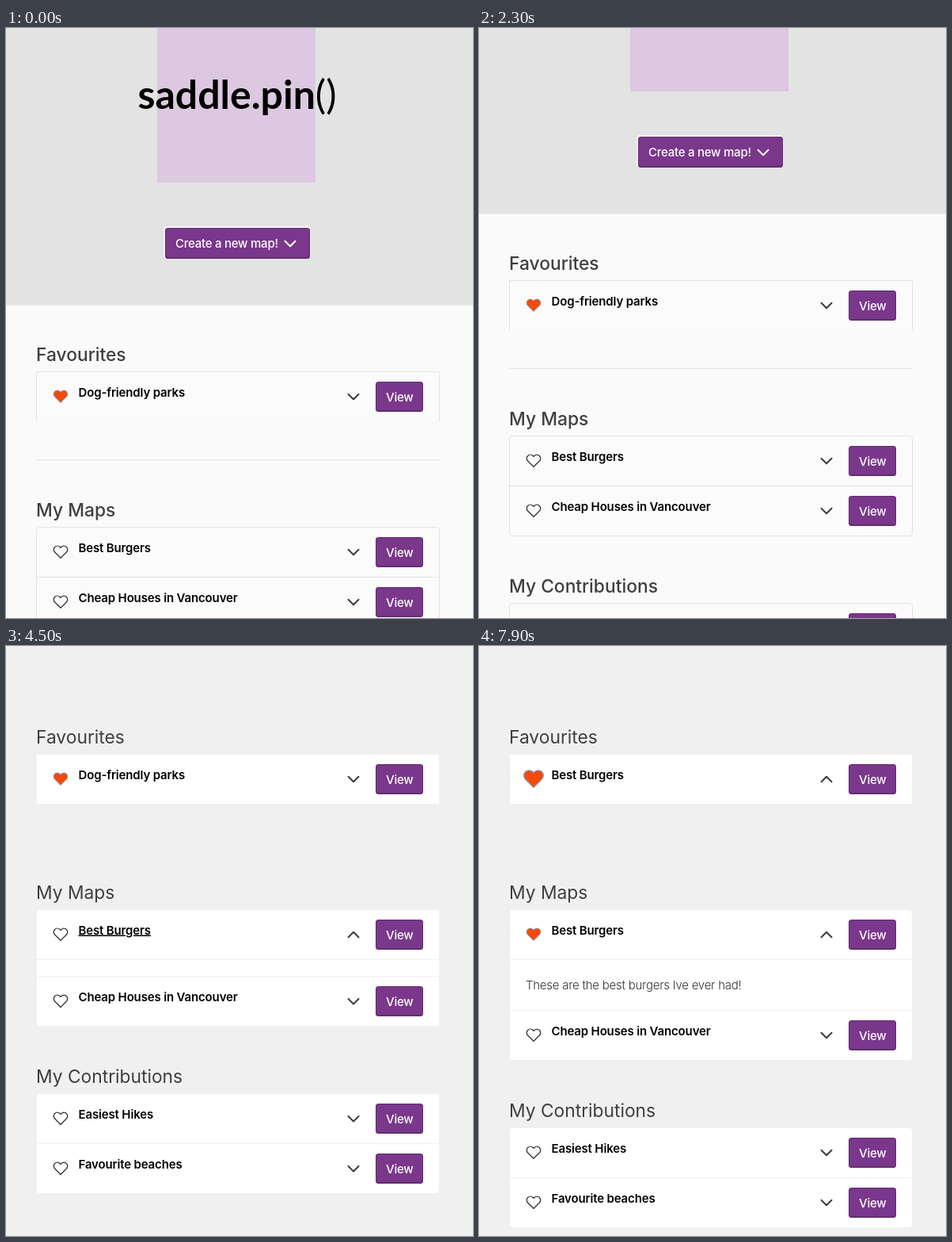
Write an HTML page that moves like this. It is 590x744 px and loops after 8000 ms.

```html
<!DOCTYPE html>
<html lang="en">
<head>
<meta charset="utf-8">
<title>Map lists</title>
<style>
  html, body { margin: 0; width: 100%; height: 100%; overflow: hidden; }
  svg { display: block; font-family: Inter, "Open Sans", sans-serif; }
  text { font-size: 15px; letter-spacing: -.25px; }
  .heading { font-size: 22.8px; letter-spacing: 0; fill: #3f3f3f; }
  .item { font-weight: 600; letter-spacing: -.15px; fill: #000; }
  .note { font-weight: 300; fill: #333; }
  .label { font-weight: 500; fill: #fff; }
  .wordmark { font: 700 50px Lato, sans-serif; letter-spacing: 0; text-anchor: middle; }
  .thin { font-weight: 400; }
  .underlined { text-decoration: underline; }
</style>
</head>
<body>
<svg id="stage" width="590" height="744" viewBox="0 0 590 744"></svg>
<script>
const LOOP = 8000;
const STEP = 100;
const PURPLE = '#7a378b';
const ROW = 63;
const GROWTH = 64;
const HEART = 'M20.84 4.61a5.5 5.5 0 0 0-7.78 0L12 5.67l-1.06-1.06a5.5 5.5 0 0 0-7.78 7.78L12 21.23l8.84-8.84a5.5 5.5 0 0 0 0-7.78z';
const SCROLL = [[0, 0], [1000, 0], [1500, 2], [1900, 7], [2100, 45], [2300, 115],
                [2600, 225], [2800, 277], [2900, 289], [3100, 297]];

const stage = document.getElementById('stage');

function ease(t, start, end) {
  const p = Math.min(1, Math.max(0, (t - start) / (end - start)));
  return p * p * (3 - 2 * p);
}

function scrollAt(t) {
  const next = SCROLL.findIndex(([time]) => time > t);
  if (next < 0) return SCROLL[SCROLL.length - 1][1];
  const [t0, y0] = SCROLL[next - 1], [t1, y1] = SCROLL[next];
  return Math.round(y0 + (y1 - y0) * (t - t0) / (t1 - t0));
}

const rect = (x, y, w, h, fill, extra = '') =>
  `<rect x="${x}" y="${y}" width="${w}" height="${h}" fill="${fill}" ${extra}/>`;

const text = (x, y, kind, content) => `<text x="${x}" y="${y}" class="${kind}">${content}</text>`;

const line = (y, color) => rect(38, y, 510, 1, color);

const chevron = (x, y, color, up) =>
  `<path transform="translate(${x} ${y}) scale(1 ${up ? -1 : 1})" d="M-6.5-3.2L0 3.3L6.5-3.2"
    fill="none" stroke="${color}" stroke-width="2" stroke-linecap="round" stroke-linejoin="round"/>`;

const button = (x, y, w, h, label) =>
  rect(x, y, w, h, '#602e6e', 'rx="3.5"') + rect(x + 1, y + 1, w - 2, h - 3, PURPLE, 'rx="2.5"') +
  text(x + 13, y + h / 2 + 5.5, 'label', label);

function heart(x, y, liked, size = 1) {
  const paint = liked ? 'fill="#f44a0a" stroke="#a08688" stroke-width="1.3"'
                      : 'fill="none" stroke="#3c3c3c" stroke-width="1.7"';
  return `<path d="${HEART}" transform="translate(${x} ${y}) scale(${.833 * size}) translate(-12 -12.5)" ${paint}/>`;
}

function row(top, { name, liked, size, open, hover }) {
  return heart(69, top + 32, liked, size) +
    text(91.5, top + 31.5, 'item' + (hover ? ' underlined' : ''), name) +
    chevron(439, top + 32, '#3c3c3c', open > 0) +
    button(467, top + 13, 60, 38, 'View');
}

function card(top, items, theme) {
  const open = items[0].note ? items[0].open : 0;
  const extra = GROWTH * open;
  const height = ROW * items.length + extra;
  const frame = items.length === 1
    ? `<path d="M38.5 ${top + ROW}V${top + .5}H547.5V${top + ROW}" fill="${theme.card}" stroke="${theme.border}"/>`
    : rect(38.5, top + .5, 509, height, theme.card, `rx="4" stroke="${theme.border}"`);
  const note = open
    ? line(top + ROW, theme.border) +
      `<svg x="0" y="${top + ROW + 1}" width="590" height="${extra}">${text(59, 37, 'note', items[0].note)}</svg>`
    : '';
  return frame + note + items.map((item, i) => {
    const y = top + i * (ROW + extra);
    return (i ? line(y, theme.border) : '') + row(y, item);
  }).join('');
}

const heading = (y, label, theme) =>
  `<text x="38" y="${y}" class="heading" font-weight="${theme.weight}">${label}</text>`;

function hero() {
  return rect(0, 0, 590, 349.5, '#e3e3e3') +
    rect(191, -5, 200, 200, '#dcc8e0') +
    text(292, 102, 'wordmark', 'saddle.pin<tspan class="thin">()</tspan>') +
    rect(199.5, 250, 184, 40, '#fafafa', 'rx="3"') +
    button(201, 252, 183, 39, 'Create a new map!') +
    chevron(359, 272, '#fff');
}

function draw(t) {
  const scrolled = t >= 2800;
  const theme = scrolled
    ? { page: '#f0f0f0', card: '#fff', border: '#f0f0f0', weight: 400 }
    : { page: '#fafafa', card: '#fbfbfb', border: '#e3e3e3', weight: 500 };

  const open = ease(t, 4250, 4900);
  const liked = t >= 6000;
  const dogLiked = t < 7700;

  const dog = { name: 'Dog-friendly parks', liked: true, size: 1 + .4 * ease(t, 7100, 7400) };
  const saved = { name: 'Best Burgers', liked: true, open: 1, size: 1 + .4 * ease(t, 7600, 7900) };
  const burgers = {
    name: 'Best Burgers', liked, open, note: 'These are the best burgers Ive ever had!',
    size: 1 + .4 * (ease(t, 5600, 5900) - ease(t, 5950, 6300)),
    hover: t >= 4000 && t < 5600
  };
  const favourites = [...(dogLiked ? [dog] : []), ...(liked ? [saved] : [])];

  const mapsShift = GROWTH * (favourites.length - 1);
  const restShift = mapsShift + GROWTH * open;

  stage.innerHTML = rect(0, 0, 590, 744, theme.page) +
    `<g transform="translate(0 ${-scrollAt(t)})">` +
    (scrolled ? '' : hero()) +
    heading(420, 'Favourites', theme) +
    card(433, favourites, theme) +
    line(544 + mapsShift, theme.border) +
    heading(616 + mapsShift, 'My Maps', theme) +
    card(629 + mapsShift, [burgers, { name: 'Cheap Houses in Vancouver' }], theme) +
    heading(827 + restShift, 'My Contributions', theme) +
    card(840 + restShift, [{ name: 'Easiest Hikes' }, { name: 'Favourite beaches' }], theme) +
    heading(1038 + restShift, 'All Other Maps', theme) +
    '</g>';
}

let shown = -1;
function tick(now) {
  const t = Math.floor(now % LOOP / STEP) * STEP;
  if (t !== shown) draw(shown = t);
  requestAnimationFrame(tick);
}
draw(0);
requestAnimationFrame(tick);
</script>
</body>
</html>
```
